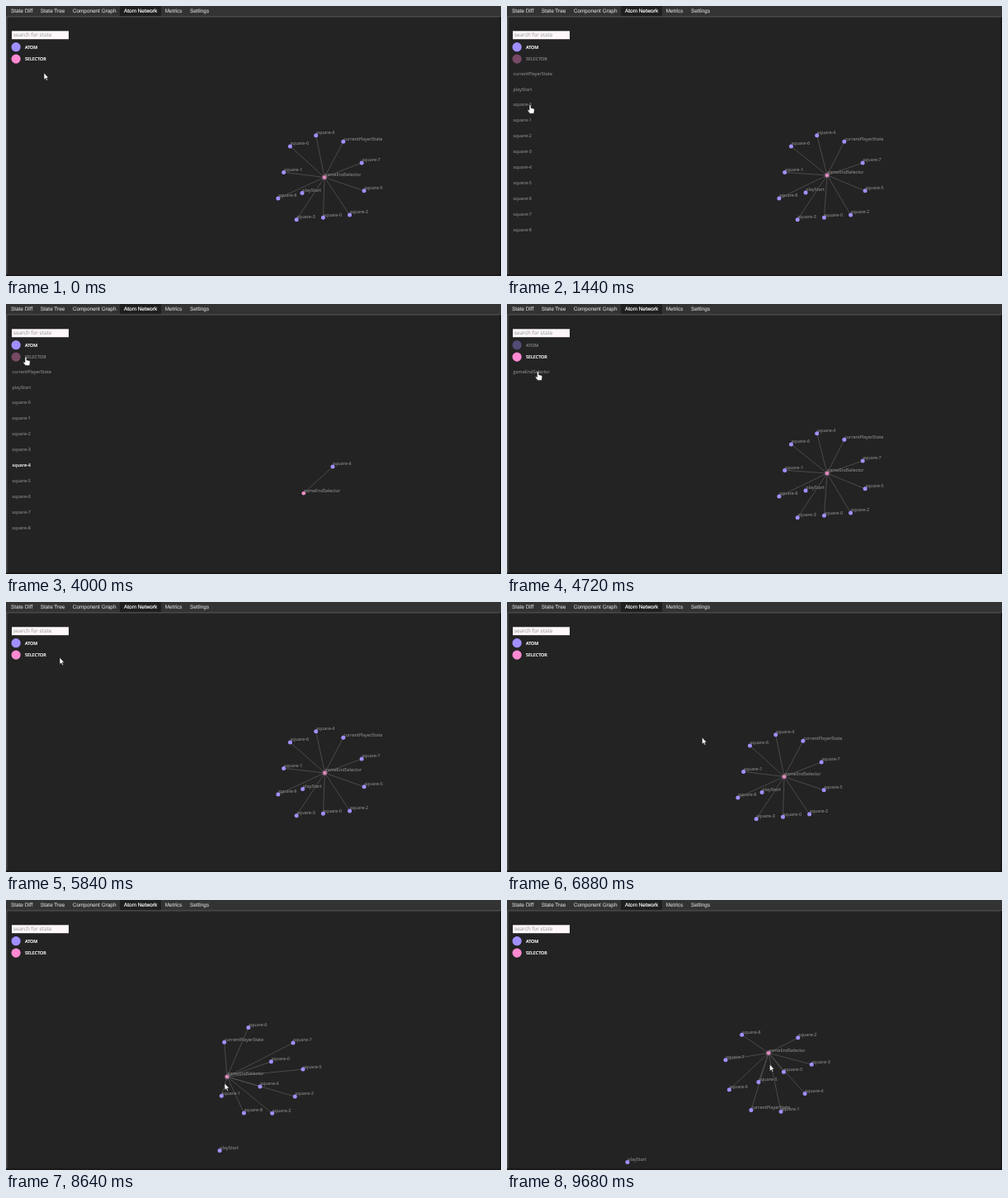
An HTML page for the animation above (9.76 s loop, 600 by 327 pixels).

```html
<!DOCTYPE html>
<html lang="en">
<head>
<meta charset="utf-8">
<title>Atom Network</title>
<style>
  html, body { margin: 0; width: 100%; height: 100%; overflow: hidden; background: #232323; }
  svg { display: block; width: 100%; height: 100%; text-rendering: geometricPrecision; }
  text { font-family: "Open Sans", "Noto Sans", sans-serif; font-size: 5.45px; stroke-width: 0.15px; }
  .tab { font-family: "Liberation Sans", Arial, sans-serif; font-size: 6.4px; }
  .key { font-size: 5.35px; font-weight: 600; }
  .hint { font-size: 6.4px; }
</style>
</head>
<body>
<svg id="stage" viewBox="0 0 600 327"></svg>
<script>
const LOOP = 9760, STEP = 80;
const ATOM = '#a18fff', SELECTOR = '#ff8ad2', DIM = '#7c7c7c';
const stage = document.getElementById('stage');

function set(el, attrs) {
  for (const k in attrs) el.setAttribute(k, attrs[k]);
}
function add(tag, attrs, parent = stage) {
  const el = document.createElementNS('http://www.w3.org/2000/svg', tag);
  set(el, attrs);
  return parent.appendChild(el);
}
function write(str, x, y, color, parent = stage, cls = '') {
  const el = add('text', { x, y, class: cls }, parent);
  el.textContent = str;
  tint(el, color);
  return el;
}
const tint = (el, color) => set(el, { fill: color, stroke: color });
const show = (el, on) => set(el, { display: on ? 'inline' : 'none' });
const rect = (x, y, width, height, fill) => add('rect', { x, y, width, height, fill });

const clamp = v => Math.max(0, Math.min(1, v));
const smooth = v => { v = clamp(v); return v * v * (3 - 2 * v); };
const easeOut = v => 1 - Math.pow(1 - clamp(v), 3);
const mix = (a, b, k) => a.map((v, i) => v + (b[i] - v) * k);
const sum = (a, b) => a.map((v, i) => v + b[i]);

// Moments of the clicks and drags
const T = { atom: 640, first: 1600, second: 3120, selector: 4240, again: 5280, reset: 5600,
            pan: 6400, panEnd: 6880, pull: 7400, swing: 8640, end: 9680 };
const PAN = [-50, 4];

// Puts the squares (digits) and the player state (c) at equal steps on an arc
function arc(order, [x, y], r, start, step) {
  const spots = {};
  [...order].forEach((id, k) => {
    const a = (start + step * k) * Math.PI / 180;
    if (id !== '-') spots[id] = [x + r * Math.cos(a), y + r * Math.sin(a)];
  });
  return spots;
}
const rest = {
  ...arc('4c752-38-6', [380.5, 211.5], 55, -95, 36),
  ...arc('-----0--1-', [380.5, 211.5], 45, -95, 36),
  hub: [386, 207.5], play: [359, 226.5]
};
const tight = { ...rest, hub: [388, 205], play: [362, 226] };
const pulled = {
  ...arc('752381-c6', [306, 207], 54, -39, 37),
  ...arc('04', [306, 207], 19, -36, 120),
  hub: [268, 214], play: [259, 303.5]
};
const swung = {
  ...arc('8-2341c67', [316.6, 205.6], 53, -127, 40),
  ...arc('05', [316.6, 205.6], 19, 8, 120),
  hub: [317, 185.3], play: [146, 317.5]
};
const pair = { hub: [360.7, 229.3], atom: [396, 197] };

const atoms = [{ id: 'c', name: 'currentPlayerState' }, { id: 'play', name: 'playStart' }];
for (let i = 0; i < 9; i++) atoms.push({ id: String(i), name: 'square-' + i });
const hub = { id: 'hub', name: 'gameEndSelector' };
const nodes = [...atoms, hub];

// Window frame and tabs
rect(0, 0, 600, 12.5, '#333');
rect(138, 0, 50, 12.5, '#1f1f1f');
rect(0, 12.2, 600, 1.4, '#4c4c4c');
rect(0, 13, 1.6, 312, '#4a4a4a');
rect(0, 325.4, 600, 1.6, '#1a1618');
rect(598.8, 13, 1.2, 314, '#0c0c0c');
let tabX = 6;
['State Diff', 'State Tree', 'Component Graph', 'Atom Network', 'Metrics', 'Settings'].forEach(name => {
  const el = write(name, tabX, 7.6, name === 'Atom Network' ? '#fff' : '#c4c4c4', stage, 'tab');
  tabX += el.getComputedTextLength() + 9.6;
});

// Graph
const links = add('g', { stroke: '#555', 'stroke-width': 0.8 });
const labels = add('g', {});
const dots = add('g', {});
nodes.forEach(n => {
  if (n !== hub && n.id !== 'play') n.link = add('line', {}, links);
  n.label = write(n.name, 0, 0, DIM, labels);
  n.dot = add('circle', { r: 2.5, fill: n === hub ? '#ee90c8' : ATOM }, dots);
});
set(hub.dot, { r: 2.3, stroke: '#a07090', 'stroke-opacity': 0.6 });

// Search box, legend and side lists
rect(7, 30.3, 69, 9.9, '#fff8fa');
write('search for state', 9, 37.2, '#aaa', stage, 'hint');
function legend(name, cy, fill) {
  const dot = add('circle', { cx: 12.1, cy, r: 5.6, fill });
  const text = write(name, 23, cy + 2.1, '#fff', stage, 'key');
  return on => {
    set(dot, { opacity: on ? 1 : 0.38 });
    tint(text, on ? '#fff' : DIM);
  };
}
const lightAtom = legend('ATOM', 49.7, ATOM);
const lightSelector = legend('SELECTOR', 64.1, SELECTOR);
const rowY = i => 83.6 + 18.9 * i;
const atomList = add('g', {});
atoms.forEach((n, i) => { n.row = write(n.name, 7.6, rowY(i), DIM, atomList); });
const selectorList = add('g', {});
write(hub.name, 7.6, rowY(0), DIM, selectorList);

// Pointer shapes, tip at the origin
const skin = { fill: '#fff', stroke: '#111', 'stroke-width': 0.5, 'stroke-linejoin': 'round' };
const arrow = add('path', { ...skin, d: 'M0 0V8.2L1.9 6.5L3.2 9.3L4.5 8.7L3.2 6H5.6Z' });
const hand = add('path', { ...skin,
  d: 'M-1 .6Q0 -.6 1 .6V4L4.3 4.6Q5.4 5 5.2 6.4L4.6 10.6H-.4L-3 7.2Q-3.2 5.8 -2 6L-1 7Z' });

// Pointer stops: arrival, place, travel time
const atRow = (i, x) => [x, rowY(i) - 1.8];
const grab = [286.5, 160];
const stops = [
  [560, [25, 50]], [1280, atRow(2, 28)], [2560, atRow(6, 26)],
  [T.selector - 320, [24, 64]], [4640, atRow(0, 37.5)], [T.again - 80, [24, 50]],
  [T.pan - 80, grab, 640], [T.panEnd, sum(grab, PAN)], [T.pull - 80, sum(rest.hub, PAN), 320],
  [T.swing, [265, 222], T.swing - T.pull], [T.end, [318.4, 199], T.end - T.swing]
];
// Sideways sweep of the last drag
const swingAt = t => clamp((t - T.swing) / (T.end - T.swing));
const sweep = t => [30 * Math.sin(Math.PI * swingAt(t)), 0];

function pointer(t) {
  let p = [46, 81];
  for (const [arrive, spot, travel = 480] of stops) {
    p = mix(p, spot, smooth((t - arrive + travel) / travel));
  }
  return sum(p, sweep(t));
}

function place({ id }, t) {
  let p = mix(rest[id], tight[id], easeOut((t - T.atom) / 700) - easeOut((t - T.reset) / 600));
  if (t >= T.selector && t < T.again) p = mix(tight.hub, p, easeOut((t - T.selector + 80) / 440));
  p = sum(p, mix([0, 0], PAN, smooth((t - T.pan) / (T.panEnd - T.pan))));
  p = mix(p, pulled[id], smooth((t - T.pull) / (T.swing - T.pull)));
  p = mix(p, swung[id], swingAt(t));
  return id === 'play' ? p : sum(p, sweep(t));
}

function placePair(n, t) {
  const since = t < T.second ? T.first : T.second;
  const goal = n === hub ? pair.hub : pair.atom;
  return mix(mix(pair.hub, pair.atom, 0.5), goal, 0.25 + 0.75 * easeOut((t - since) / 560));
}

function draw(t) {
  const mode = t < T.atom || t >= T.reset ? 'both'
             : t >= T.selector && t < T.again ? 'selector' : 'atom';
  const picked = t < T.first || t >= T.selector ? '' : t < T.second ? 'square-0' : 'square-4';

  lightAtom(mode !== 'selector');
  lightSelector(mode !== 'atom');
  show(atomList, mode === 'atom');
  show(selectorList, mode === 'selector');
  atoms.forEach(n => tint(n.row, n.name === picked ? '#fff' : DIM));

  const at = n => picked ? placePair(n, t) : place(n, t);
  const [x1, y1] = at(hub);
  nodes.forEach(n => {
    const on = !picked || n === hub || n.name === picked;
    const [x, y] = at(n);
    set(n.dot, { cx: x, cy: y });
    set(n.label, { x: x + 0.3, y: y - 1.6 });
    if (n.link) set(n.link, { x1, y1, x2: x, y2: y });
    [n.dot, n.label, n.link].forEach(el => el && show(el, on));
  });
  set(hub.dot, { 'stroke-width': picked ? 0 : 1.6 });

  const pointing = t >= 480 && t < T.reset + 120;
  const [px, py] = pointer(t);
  show(hand, pointing);
  show(arrow, !pointing);
  set(pointing ? hand : arrow, { transform: `translate(${px} ${py})` });
}

const begin = performance.now();
function tick() {
  const t = (performance.now() - begin) % LOOP;
  draw(Math.floor(t / STEP) * STEP);
  requestAnimationFrame(tick);
}
tick();
</script>
</body>
</html>
```
